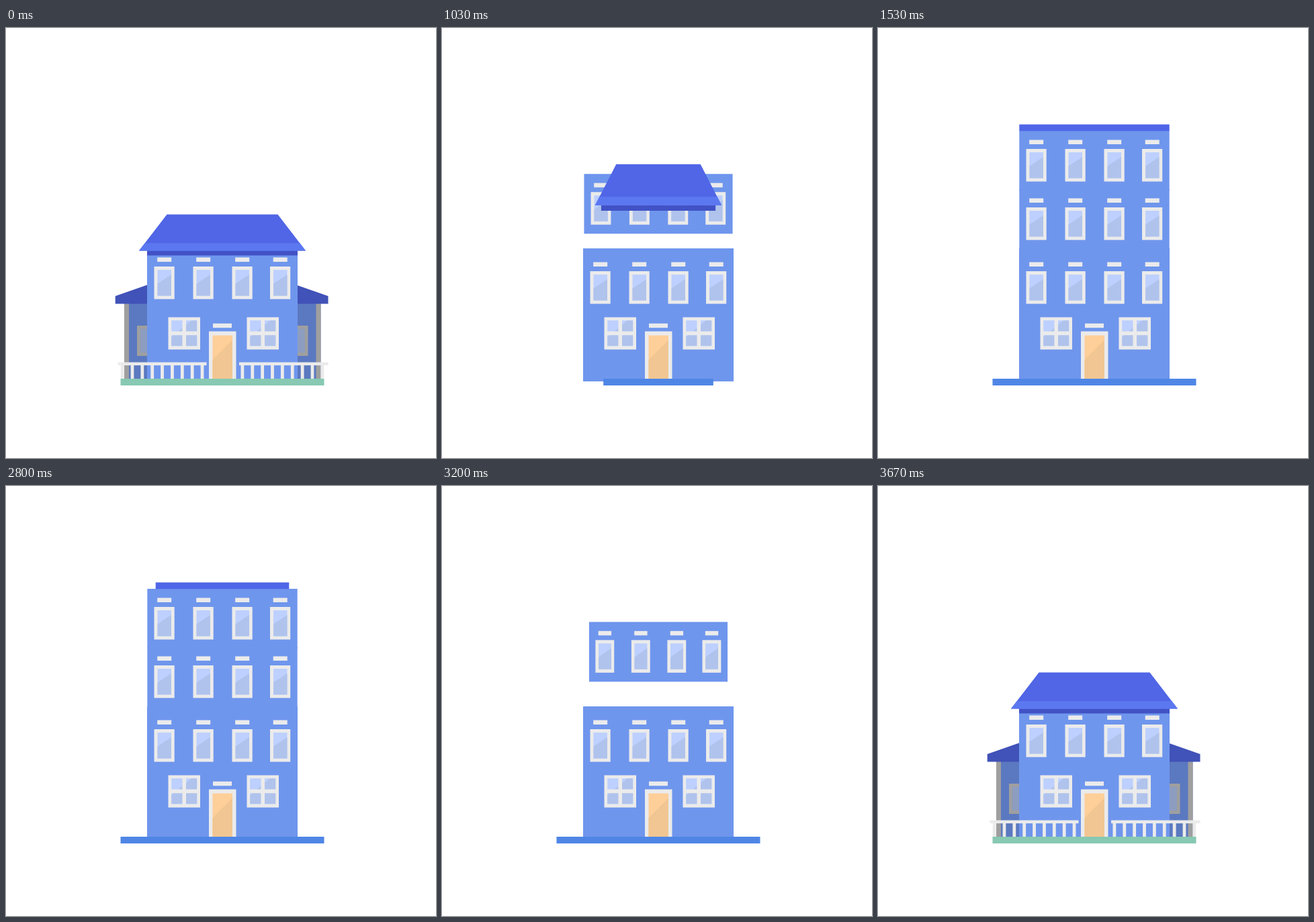
Recreate the animation shown at these times as an HTML page. Size 640x640 px, loop 4.36 s.

```html
<!DOCTYPE html>
<html lang="en">
<head>
<meta charset="utf-8">
<title>House</title>
<style>
html, body { margin: 0; width: 100%; height: 100%; overflow: hidden; background: #fff; }
svg { display: block; width: 100vw; height: 100vh; }
</style>
</head>
<body>
<svg id="stage" viewBox="0 0 640 640"></svg>
<script>
const LOOP = 4360, FPS = 30, MID = 322;
const C = {
  wall: '#6f96ed', trim: '#ebebeb', glass: '#bdd0ff', shade: '#b0c3ec',
  roof: '#5066e6', eave: '#5c78f0', band: '#4152c6', top: '#4f66e8',
  sideWall: '#5b79c0', sideRoof: '#4152b8', sideTrim: '#9f9f9f', sideGlass: '#8d9dbf',
  lawn: '#87c9b3', street: '#4f86e6', door: '#ffcf99', doorShade: '#f1c692'
};

const rect = (x, y, w, h, fill) => `<rect x="${x}" y="${y}" width="${w}" height="${h}" fill="${fill}"/>`;
const poly = (points, fill) => `<polygon points="${points}" fill="${fill}"/>`;
const group = (id, body) => `<g id="${id}">${body}</g>`;

// Four sash windows with lintels, measured from the top of a floor
const sashes = () => [220.5, 278.5, 336.5, 393].map(x =>
  rect(x + 4.7, 13.5, 21, 6.5, C.trim) +
  rect(x, 27, 30.2, 48.5, C.trim) +
  rect(x + 5, 32, 20.5, 38.5, C.glass) +
  poly(`${x + 5},52.5 ${x + 25.5},39 ${x + 25.5},70.5 ${x + 5},70.5`, C.shade)).join('');

const crossWindow = x => `<g transform="translate(${x} 430.5)">` +
  rect(0, 0, 47.5, 48, C.trim) +
  rect(4.7, 4.7, 38, 38, C.glass) +
  poly('4.7,29.5 34.5,4.7 42.7,4.7 42.7,42.7 4.7,42.7', C.shade) +
  rect(21, 2, 5.5, 44, C.trim) + rect(2, 21, 43.5, 5.7, C.trim) + '</g>';

const floor = () => rect(210.3, 0, 223.4, 89, C.wall) + sashes();

const sideWing = roofShift =>
  rect(176, 410, 100, 112, C.sideWall) +
  rect(176, 410, 7, 112, C.sideTrim) +
  rect(195, 443, 32, 45, C.sideTrim) +
  rect(199.7, 447.7, 22, 35.6, C.sideGlass) +
  `<g transform="translate(${roofShift} 0)">` +
  poly('162.7,399 232,374.8 232,410.5 162.7,410.5', C.sideRoof) + '</g>';

const posts = x0 => Array.from({ length: 9 }, (_, i) =>
  rect(x0 + 14.87 * i, -22, 4.8, 22, C.trim)).join('');

const stage = document.getElementById('stage');
stage.innerHTML =
  group('leftWing', sideWing(0)) +
  group('rightWing', sideWing(2.3)) +
  rect(210, 328, 224, 198, C.wall) +
  group('windows', sashes()) +
  crossWindow(241.5) + crossWindow(358.5) +
  rect(308, 439.8, 28, 6.4, C.trim) +
  rect(302, 451.5, 40.5, 70.5, C.trim) +
  rect(307.5, 457.5, 29.5, 64.5, C.door) +
  poly('307.5,494 337,464.5 337,522 307.5,522', C.doorShade) +
  group('rails',
    posts(170.7) + posts(349.5) +
    rect(166.5, -24.5, 132, 4.6, C.trim) + rect(347, -24.5, 132.5, 4.6, C.trim)) +
  group('street', rect(-151.5, 522, 303, 10, C.street)) +
  group('lawn', rect(-151.5, 522, 303, 10, C.lawn)) +
  group('floor2', floor()) +
  group('floor3', floor()) +
  group('cap', rect(-111.7, 143.5, 223.4, 9.8, C.top)) +
  group('roof',
    rect(-112, -7, 224, 7, C.band) +
    poly('-82.5,-61 82.5,-61 124,-7 -124,-7', C.roof) +
    poly('-115.4,-18.2 115.4,-18.2 124,-7 -124,-7', C.eave));

const part = Object.fromEntries([...stage.querySelectorAll('g[id]')].map(g => [g.id, g]));
const clamp = v => Math.min(1, Math.max(0, v));
const smooth = v => v * v * (3 - 2 * v);
const span = (n, a, b) => clamp((n - a) / (b - a));
const mix = (a, b, v) => a + (b - a) * v;

function place(id, x, y, sx = 1, sy = 1) {
  part[id].setAttribute('visibility', sx > 0.001 && sy > 0.001 ? 'visible' : 'hidden');
  part[id].setAttribute('transform', `translate(${x} ${y}) scale(${sx} ${sy})`);
}

// Rests at `rest`, swells to `peak`, then closes to `gone`
function leave(n, start, end, rest, peak, gone, hold = 0) {
  if (n < start) return rest;
  return mix(peak, gone, span(n, start + hold, end) ** 2);
}

// Opens from `gone` to `peak`, then settles at `rest`
function enter(n, start, end, rest, peak, gone, power = 2) {
  if (n >= end) return rest;
  return mix(peak, gone, (1 - span(n, start, end - 1)) ** power);
}

// u is 0 when the floor is seated and 1 when it is gone
function placeFloor(id, y, u) {
  const s = 1 - u ** 5;
  place(id, MID * (1 - s), y - 43 * smooth(clamp(1.3 * u)), s);
}

function placeRoof(n) {
  let lift, sx, sy;
  if (n < 64) {
    const p = span(n, 28, 34);
    lift = 66.5 * (2 * p) ** 1.5;
    sx = 1 - 0.96 * p * p;
    sy = 1 + 0.54 * p * p;
    if (p === 1) sx = 0;
  } else {
    const p = 1 - span(n, 100, 105);
    lift = 64 * p;
    sx = 1 - p * p;
    sy = 1 + 0.39 * p * p;
  }
  place('roof', MID, 338.5 - lift, sx, sy);
}

function draw(time) {
  const n = Math.floor((time % LOOP + 5) * FPS / 1000);
  const early = n < 64;

  const slide = early ? leave(n, 23, 28, 0, 7.5, -52) : enter(n, 104, 110, 0, 7.5, -52);
  place('leftWing', -slide, 0);
  part.rightWing.setAttribute('transform', `translate(${644.5 + slide} 0) scale(-1 1)`);

  place('rails', 0, 522, 1, early ? leave(n, 23, 27, 1, 1.19, 0) : enter(n, 105, 110, 1, 1.19, 0));
  place('lawn', MID, 0, early ? leave(n, 23, 28, 1, 1.053, 0) : enter(n, 104, 110, 1, 1.053, 0));
  place('street', MID, 0, early ? enter(n, 29, 38, 1, 1.053, 0, 2.5) : leave(n, 98, 104, 1, 1.053, 0, 1));

  const drop = early ? span(n, 28, 31) : 1 - span(n, 100, 105);
  place('windows', 0, 328 + 7 * smooth(drop));

  placeFloor('floor2', 240, early ? 1 - span(n, 28, 33) : span(n, 93, 98));
  placeFloor('floor3', 153, early ? 1 - span(n, 39, 44) : span(n, 87, 92));

  const cap = early ? 1 - span(n, 43, 46) : span(n, 83, 86);
  place('cap', MID, 0, 1 - cap * cap);
  placeRoof(n);
}

const begin = performance.now();
function tick() {
  draw(performance.now() - begin);
  requestAnimationFrame(tick);
}
tick();
</script>
</body>
</html>
```
